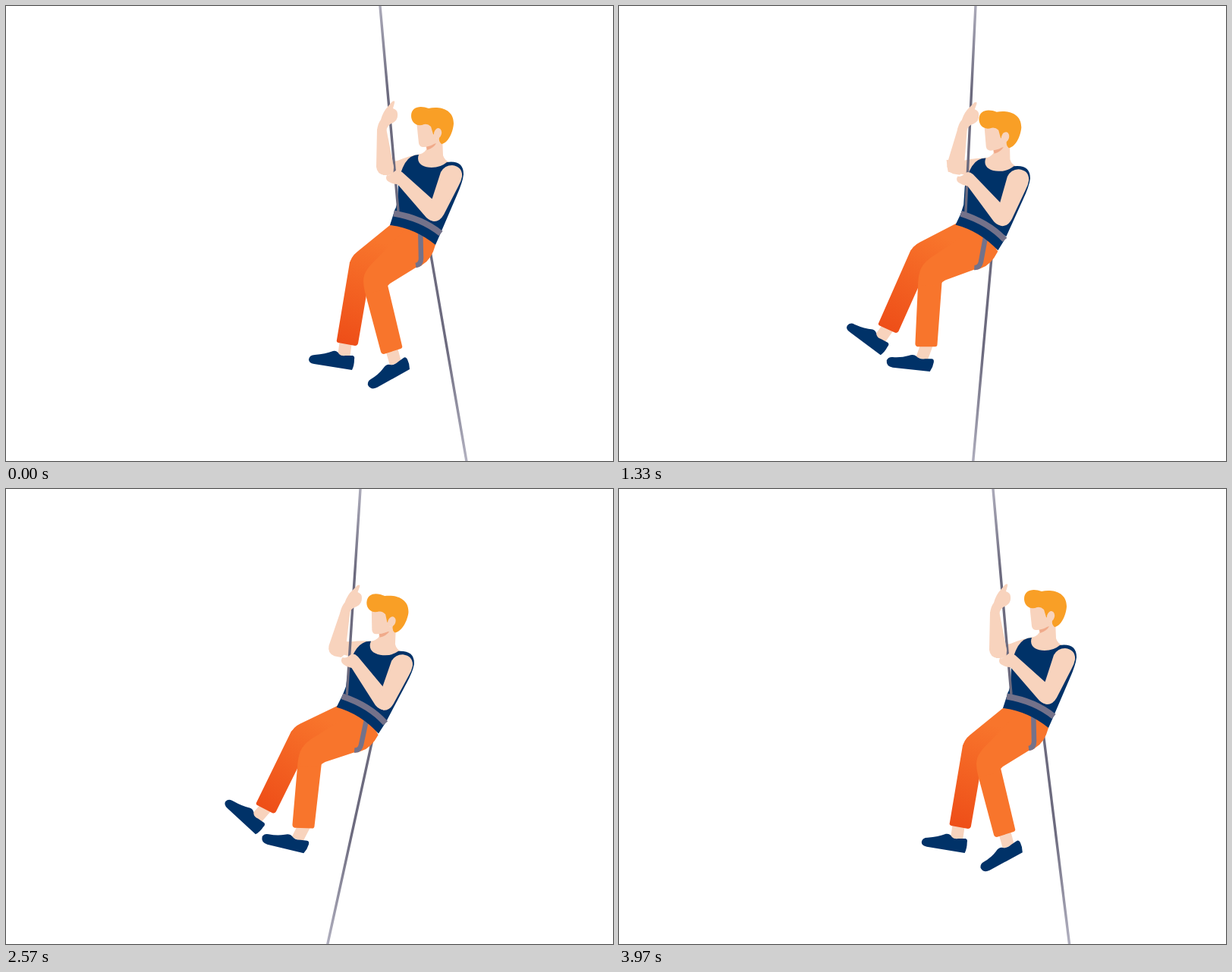
Recreate the animation shown at these times as an HTML page. Size 800x600 px, loop 4010 ms.

```html
<!DOCTYPE html>
<html lang="en">
<head>
<meta charset="utf-8">
<title>Swinging climber</title>
<style>
html, body { margin: 0; width: 100%; height: 100%; overflow: hidden; background: #fff; }
svg { display: block; width: 100%; height: 100%; }
.skin { fill: #f8d3bd; }
.navy { fill: #003268; }
.orange { fill: #f8752c; }
.gear { fill: none; stroke: #74728a; }
.rope { fill: none; stroke-width: 3.4; }
</style>
</head>
<body>
<svg viewBox="0 0 800 600">
  <defs>
    <linearGradient id="topFade" gradientUnits="userSpaceOnUse" x1="0" y1="0" x2="0" y2="110">
      <stop offset="0" stop-color="#abaab9"/><stop offset="1" stop-color="#6c6a7e"/>
    </linearGradient>
    <linearGradient id="lowFade" gradientUnits="userSpaceOnUse" x1="0" y1="450" x2="0" y2="600">
      <stop offset="0" stop-color="#6c6a7e"/><stop offset="1" stop-color="#b2b1c0"/>
    </linearGradient>
    <linearGradient id="backLeg" gradientUnits="userSpaceOnUse" x1="490" y1="310" x2="448" y2="446">
      <stop offset="0" stop-color="#f8752c"/><stop offset="1" stop-color="#ee4e18"/>
    </linearGradient>
  </defs>
  <g data-part="body">
    <g data-part="thighs">
      <path class="rope" data-part="lowRope" stroke="url(#lowFade)" d="M558 317 L614 641"/>
      <g data-part="backShin">
        <g data-part="backFoot">
          <path class="skin" d="M440 440 L456 443 L453 465 L437 462Z"/>
          <path class="navy" d="M399 466 Q400 460 407 460 Q421 459 431 455 Q436 454 439 459 Q442 462 447 461 L457 461 Q460 462 459 466 Q459 474 456 480 L406 472 Q399 471 399 466Z"/>
        </g>
        <path fill="url(#backLeg)" d="M453 338 Q459 325 475 325 L488 340 L475 381 L464 445 Q463 448 460 448 L438 444 Q435 443 436 440Z"/>
      </g>
      <path fill="url(#backLeg)" d="M506 289 L463 324 Q454 331 453 341 L480 358 L530 318 L548 292Z"/>
      <g data-part="frontShin">
        <g data-part="frontFoot">
          <path class="skin" d="M499 450 L515 447 L521 469 L506 474Z"/>
          <path class="navy" d="M481 492 Q491 486 497 478 Q501 472 506 473 Q512 474 517 469 L524 464 Q527 462 529 466 Q532 472 532 479 L489 503 Q481 507 477 500 Q476 495 481 492Z"/>
        </g>
        <path class="orange" d="M471 362 Q472 345 488 344 Q501 345 503 368 L522 448 Q523 451 520 452 L498 459 Q495 459 494 456 L473 377 Q471 369 471 362Z"/>
      </g>
      <path class="orange" d="M508 289 Q545 289 566 315 Q561 334 549 341 Q546 344 540 345 L506 366 Q502 369 500 374 L475 380 Q469 361 474 351 Q478 343 488 334 L524 296Z"/>
      <path class="gear" stroke-width="6.5" d="M546 286 L547 333 Q547 341 540 342"/>
    </g>

    <g data-part="torso">
      <path class="skin" data-part="backArm" d="M492 208 Q505 206 516 204 Q530 198 546 195 L546 222 L497 223Z"/>
      <path class="skin" d="M553 180 L575 172 L576 197 Q578 204 586 207 L570 222 L538 214 L540 197 Q551 195 554 189Z"/>
      <path fill="#f0aa8a" d="M554 185 L567 181 Q564 187 555 190Z"/>
      <path class="skin" d="M541 152 L544 181 Q545 186 550 186 Q565 185 567 177 L567 152Z"/>
      <path fill="#f99f26" d="M534 145 C534 132 547 131 557 135 C570 132 590 135 590 155 C589 168 582 181 574 182 Q570 179 571 173 L563 169 L560 159 Q556 155 551 156 C541 160 534 153 534 145Z"/>
      <ellipse class="skin" cx="569" cy="168" rx="5" ry="7" transform="rotate(15 569 168)"/>
      <path class="navy" d="M544 196 C540 207 549 213 561 213 Q573 213 581 206 Q603 203 603 222 Q602 232 594 250 L573 299 Q544 279 512 272 L516 258 L517 235 Q519 219 526 207 Q533 196 544 196Z"/>
    </g>
    <path class="navy" d="M513 267 L506 289 Q539 293 566 315 L574 297Z"/>
    <path class="rope" stroke="url(#topFade)" d="M489 -45 L493 0 L517 271"/>
    <path class="skin" data-part="forearm" d="M489 163 L488 212 Q489 222 499 223 L508 222 Q513 216 510 207 L501 161 Q494 153 489 163Z"/>
    <path class="skin" data-part="hand" d="M489 164 Q490 155 494 150 Q497 139 503 133 L509 126 Q513 124 512 128 L510 135 Q516 137 516 142 Q517 150 510 154 Q502 157 501 165Z"/>
    <path class="gear" stroke-width="8" d="M511 273.500 Q549 280 573 300"/>

    <g data-part="torso">
      <g data-part="frontArm">
        <g data-part="frontForearm">
          <path class="skin" d="M565 257 L561 254 L522 219 Q515 214 511 219 Q507 224 502 223 Q499 229 505 232 Q510 235 516 235 L554 279 Q563 287 572 281Z"/>
        </g>
        <path class="skin" d="M573 219 Q578 210 588 210 Q602 212 601 225 Q600 231 596 238 L577 275 Q572 284 564 284 Q555 282 554 274 Q557 263 562 253Z"/>
      </g>
    </g>
  </g>
</svg>
<script>
const LOOP = 4010;
const clamp = x => Math.min(1, Math.max(0, x));
const soft = x => x * x * (3 - 2 * x);
const steep = x => x * x * x * (x * (6 * x - 15) + 10);

// Swing out until a, rest until b, swing back until c.
const swing = (t, a, b, c, back = steep) =>
  t < b ? steep(clamp(t / a)) : 1 - back(clamp((t - b) / (c - b)));

function turn(part, angle, x, y) {
  for (const el of document.querySelectorAll(`[data-part=${part}]`))
    el.setAttribute("transform", `rotate(${angle} ${x} ${y})`);
}

function draw() {
  const t = performance.now() % LOOP;
  const lead = swing(t, 1800, 1900, 3300);
  const main = swing(t, 2000, 2080, 3990);
  const late = swing(t, 2100, 2200, 4250);
  const rope = swing(t, 2300, 2300, 4430, soft);

  turn("body", 9.9 * main, 479, -169);
  turn("torso", -7.5 * lead, 543, 286);
  turn("backArm", 12 * main, 543, 205);
  turn("forearm", 10 * main, 497, 183);
  turn("hand", -5 * main, 508, 130);
  turn("frontArm", -4 * main, 587, 220);
  turn("frontForearm", 8 * main, 566, 270);
  turn("thighs", 5 * main, 545, 315);
  turn("lowRope", 23.2 * rope - 14.9 * main, 560, 329);
  turn("backShin", 3.5 * late, 470, 342);
  turn("frontShin", 7.4 * main, 488, 360);
  turn("backFoot", 18 * late, 447, 450);
  turn("frontFoot", 24 * late, 508, 455);
  requestAnimationFrame(draw);
}
draw();
</script>
</body>
</html>
```
